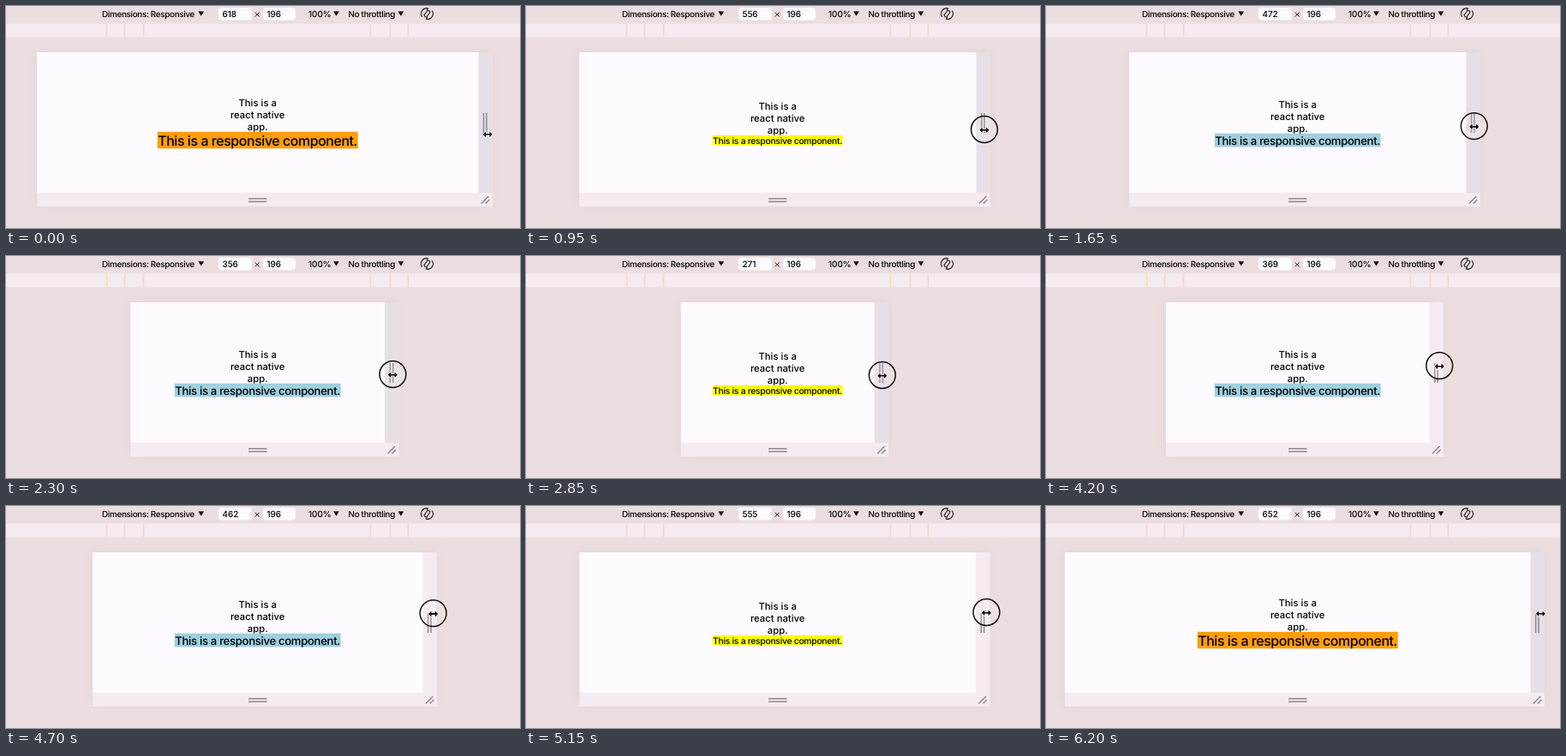
An HTML page that plays this animation: 600 px wide and 259 px high, repeating every 6.25 s.

```html
<!DOCTYPE html>
<html lang="en">
<head>
<meta charset="utf-8">
<title>Responsive resize</title>
<style>
  html, body { margin: 0; width: 100%; height: 100%; overflow: hidden; background: #ecdee0; }
  svg { display: block; width: 600px; height: 259px; }
  text { font-family: Inter, Roboto, sans-serif; font-weight: 500; fill: #000; text-rendering: geometricPrecision; }
  .bar text { font-size: 9.9px; letter-spacing: -.033em; }
  .bar .num { font-size: 10px; letter-spacing: -.01em; }
  .copy text { font-size: 11.3px; text-anchor: middle; }
  #label { text-anchor: middle; letter-spacing: -.027em; }
  .grip { stroke: #8f898e; stroke-width: 1.5; fill: none; }
  .tick { stroke: #f8d6c6; stroke-width: 1.6; }
</style>
</head>
<body>
<svg viewBox="0 0 600 259">
  <defs>
    <filter id="soft" x="-10%" y="-10%" width="120%" height="120%"><feGaussianBlur stdDeviation="6"/></filter>
  </defs>

  <rect width="600" height="259" fill="#ecdee0"/>
  <rect y="20.5" width="600" height="16" fill="#f6ebf0"/>
  <g id="ticks"></g>

  <g class="bar">
    <text x="112" y="13">Dimensions: Responsive</text>
    <rect x="248" y="2" width="39" height="14.5" rx="4" fill="#fdfbff"/>
    <rect x="300" y="2" width="38" height="14.5" rx="4" fill="#fdfbff"/>
    <text class="num" id="size" x="252.5" y="13">618</text>
    <path d="M290.7 7.5l5 5m0-5l-5 5" stroke="#222" stroke-width="1"/>
    <text class="num" x="304.5" y="13">196</text>
    <text class="num" x="353" y="13">100%</text>
    <text x="399.5" y="13">No throttling</text>
    <path d="M224.5 6.2h6.6l-3.3 5.6zM382.2 6.2h6.6l-3.3 5.6zM457.700 6.200h6.600l-3.300 5.600z" fill="#111"/>
    <g transform="translate(491.500 9) rotate(35)" fill="none" stroke="#222" stroke-width="1.100">
      <rect x="-1.800" y="-4" width="3.600" height="8" rx="1"/>
      <path d="M-2.500 6.300A6.300 6.300 0 0 1 -3.500 -5.300M2.500 -6.300A6.300 6.300 0 0 1 3.500 5.300M-5.300 -4.600l2.600 -1 .3 2.500M5.300 4.600l-2.600 1 -.3 -2.500"/>
    </g>
  </g>

  <rect id="shadow" y="54" height="178" fill="#6a4a60" opacity=".08" filter="url(#soft)"/>
  <rect id="tray" y="54" height="180" fill="#f5ebf1"/>
  <rect id="side" y="54" width="16.500" height="164" fill="#e7dfe6"/>
  <rect id="pane" y="54" height="163.700" fill="#fdfbff"/>
  <path class="grip" d="M283 224.700h21.500M283 228.300h21.500"/>
  <g id="grips" class="grip">
    <path d="M6.300 125v23M9.700 125v23"/>
    <path d="M3.500 230.500l8.500-8.500M8.500 230.500l4.500-4.500"/>
  </g>

  <g id="copy" class="copy">
    <text x="293.700" y="11.800">This is a</text>
    <text x="293.700" y="25.600">react native</text>
    <text x="293.700" y="39.400">app.</text>
  </g>
  <rect id="strip"/>
  <text id="label" x="293.600">This is a responsive component.</text>

  <g id="cursor">
    <circle id="press" r="15.400" fill="#fff" fill-opacity=".12" stroke="#111" stroke-width="1.500"/>
    <path d="M-5.500 .8l3.300-3.300v2.500h4.400v-2.500l3.300 3.300-3.300 3.300v-2.500h-4.400v2.500z" fill="#000" stroke="#fff" stroke-width="1.200" paint-order="stroke"/>
  </g>
</svg>
<script>
const LOOP = 6250, STEP = 50, SCALE = 5 / 6, MID = 293.75;
const $ = id => document.getElementById(id);
const set = (id, attrs) => {
  for (const k in attrs) $(id).setAttribute(k, attrs[k]);
};

// [time, device width]
const widths = [[0, 618], [100, 618], [650, 590], [950, 556], [1300, 528], [1950, 415],
  [2300, 356], [2600, 321], [3150, 229], [3250, 229], [3400, 235], [3900, 292], [4200, 369],
  [4550, 432], [5150, 555], [5750, 652], [6250, 652]];
// [time, pointer y]
const heights = [[0, 149], [950, 144], [2300, 138], [3400, 140], [4200, 128],
  [5150, 124], [6250, 125]];
// [time, pointer distance from the pane's right edge]
const leads = [[0, 11], [950, 9.6], [2300, 9.4], [3400, 9], [4200, 11.8], [5150, 12.5], [6250, 12]];

// Monotone cubic through the points
function at(keys, t) {
  const slope = i => (keys[i + 1][1] - keys[i][1]) / (keys[i + 1][0] - keys[i][0]);
  const tangent = i => {
    if (i < 1 || i > keys.length - 2) return 0;
    const a = slope(i - 1), b = slope(i);
    return a * b > 0 ? 2 * a * b / (a + b) : 0;
  };
  let i = 0;
  while (i < keys.length - 2 && t >= keys[i + 1][0]) i++;
  const [t0, a] = keys[i], [t1, b] = keys[i + 1];
  const d = t1 - t0, u = (t - t0) / d, v = 1 - u;
  return a * (1 + 2 * u) * v * v + b * u * u * (3 - 2 * u)
    + d * u * v * (v * tangent(i) - u * tangent(i + 1));
}

const small = { color: '#ffff00', size: 10.35, w: 152, h: 11.6 };
const medium = { color: '#9fcfe0', size: 13.2, w: 194, h: 15.8 };
const large = { color: '#ff9d0a', size: 15.95, w: 234, h: 19.5 };
const styleFor = w => w >= 600 ? large : w >= 320 && w < 480 ? medium : small;

for (const w of [320, 375, 425])
  for (const x of [MID - w * SCALE / 2, MID + w * SCALE / 2 - 1.8])
    $('ticks').innerHTML += `<path class="tick" d="M${Math.round(x) + .5} 20.500v16"/>`;

function draw(t) {
  const w = at(widths, t), half = w * SCALE / 2;
  const left = MID - half, right = MID + half;
  set('pane', { x: left, width: 2 * half });
  set('shadow', { x: left, width: 2 * half + 14 });
  set('tray', { x: left, width: 2 * half + 16.5 });
  set('side', { x: right, visibility: t > 3650 && t < 5800 ? 'hidden' : 'visible' });
  set('grips', { transform: `translate(${right} 0)` });
  // The readout trails the pane as it starts to grow
  $('size').textContent = Math.round(t > 3250 && t < 3500 ? w - 2 : w);

  const s = styleFor(w), top = 135.8 - (41.5 + s.h) / 2, y = top + 41.5;
  set('copy', { transform: `translate(0 ${top})` });
  set('strip', { x: MID - s.w / 2, y, width: s.w, height: s.h, fill: s.color });
  set('label', { y: y + s.h / 2 + s.size * .39, 'font-size': s.size });

  set('cursor', { transform: `translate(${right + at(leads, t)} ${at(heights, t)})` });
  set('press', { visibility: t >= 100 && t < 5950 ? 'visible' : 'hidden' });
}

const start = performance.now();
function frame(now) {
  const t = Math.max(0, now - start) % LOOP;
  draw(Math.floor(t / STEP) * STEP);
  requestAnimationFrame(frame);
}
draw(0);
requestAnimationFrame(frame);
</script>
</body>
</html>
```
